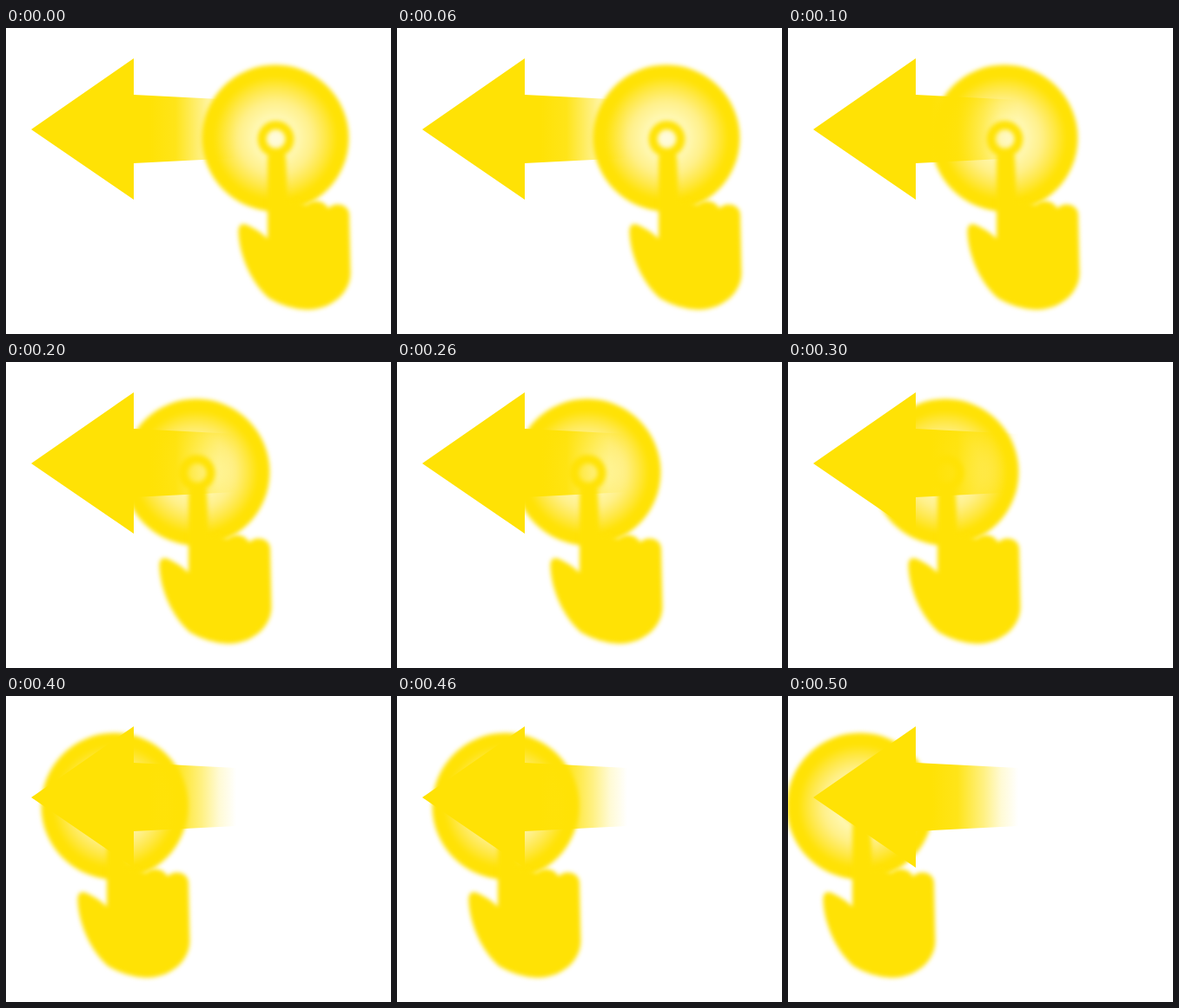
An HTML page that plays this animation: 443 by 353 pixels, repeating every 0.6 s.

```html
<!DOCTYPE html>
<html lang="en">
<head>
<meta charset="utf-8">
<title>Swipe left</title>
<style>
  html, body { margin: 0; width: 100%; height: 100%; overflow: hidden; background: #fff; }
  svg { display: block; width: 443px; height: 353px; }
</style>
</head>
<body>
<svg viewBox="0 0 443 353">
  <defs>
    <radialGradient id="glow" gradientUnits="userSpaceOnUse" cx="310" cy="127" r="85">
      <stop offset="0" stop-color="#fffce0"/>
      <stop offset=".28" stop-color="#fff8b4"/>
      <stop offset=".5" stop-color="#fff08a"/>
      <stop offset=".68" stop-color="#ffe848"/>
      <stop offset=".84" stop-color="#ffe205"/>
    </radialGradient>
    <linearGradient id="fade" gradientUnits="userSpaceOnUse" x1="165" y1="0" x2="265" y2="0">
      <stop offset="0" stop-color="#ffe205"/>
      <stop offset=".3" stop-color="#ffe205" stop-opacity=".92"/>
      <stop offset=".6" stop-color="#ffe205" stop-opacity=".5"/>
      <stop offset=".8" stop-color="#ffe205" stop-opacity=".17"/>
      <stop offset="1" stop-color="#ffe205" stop-opacity="0"/>
    </linearGradient>
    <filter id="soft" filterUnits="userSpaceOnUse" x="200" y="20" width="230" height="330" color-interpolation-filters="sRGB">
      <feGaussianBlur stdDeviation="2.6"/>
    </filter>
  </defs>
  <g id="touch">
    <circle cx="310" cy="127" r="84.5" fill="url(#glow)" filter="url(#soft)"/>
    <g filter="url(#soft)">
      <circle cx="310.500" cy="128" r="16" fill="none" stroke="#ffe205" stroke-width="10"/>
      <path fill="#ffe205" d="M301 150 Q302 140 311 140 Q321 140 322 150 L324 199
        Q336 198 345 204 C352 197 365 198 371 208 C379 200 394 203 395 215
        L396.500 283 C396 306 374 325 346 325 Q323 324 303 312
        C284 296 269 265 267.500 237 C267 227 271 224 279 228 Q292 234 301 243 Z"/>
    </g>
  </g>
  <path fill="url(#fade)" d="M29 117 L147 35 V77 L265 83 V150 L147 156 V198 Z"/>
</svg>
<script>
  const shifts = [0, -61, -91, -129, -185, -227];
  const hold = 100;
  const touch = document.getElementById('touch');

  function draw(now) {
    const step = Math.floor(now / hold) % shifts.length;
    touch.setAttribute('transform', `translate(${shifts[step]} 0)`);
    requestAnimationFrame(draw);
  }
  draw(performance.now());
</script>
</body>
</html>
```
